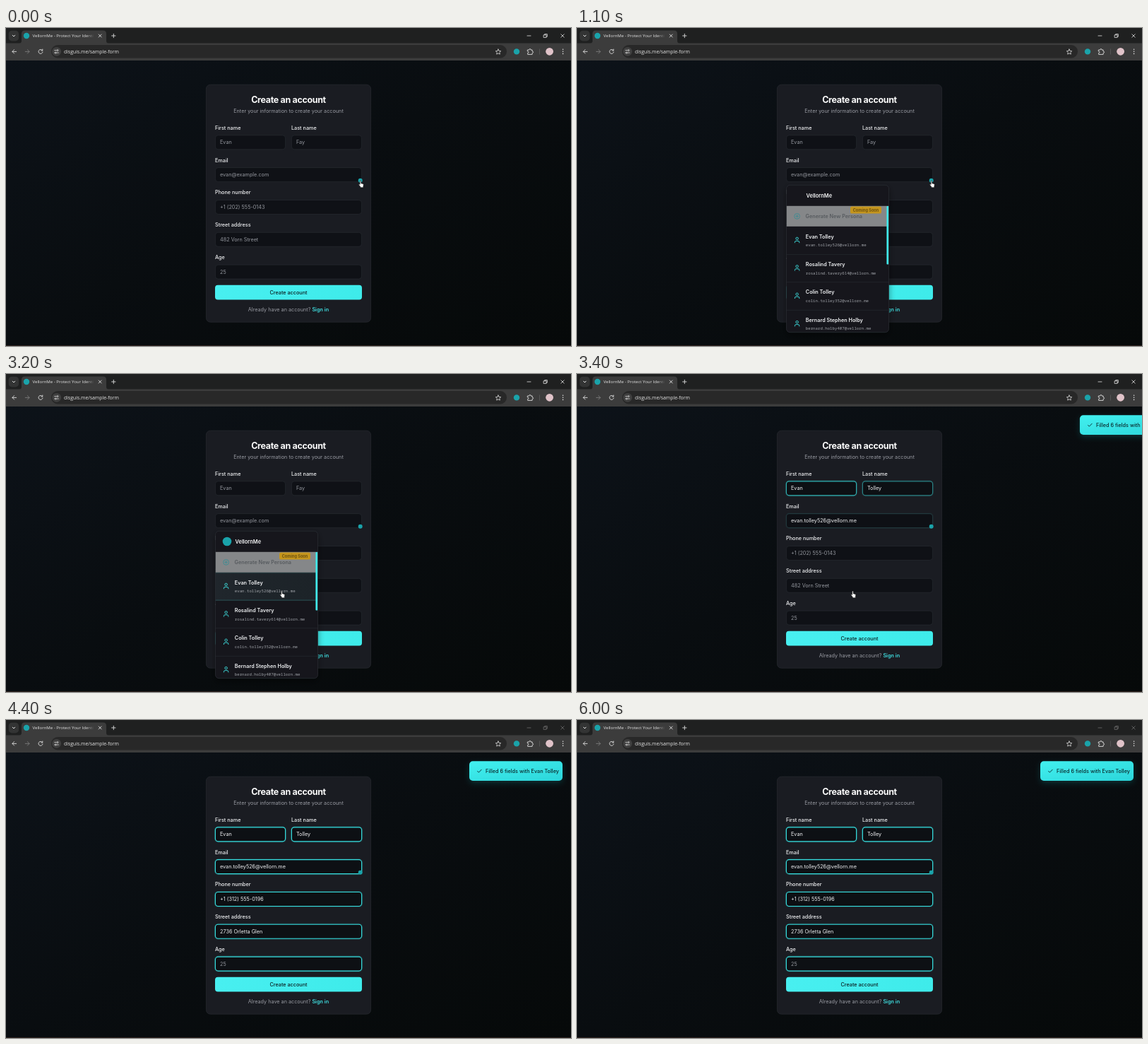
These frames come from a looping animation (800 px wide and 450 px high, 6100 ms). An HTML page:

```html
<!DOCTYPE html>
<html lang="en">
<head>
<meta charset="utf-8">
<title>Sample form</title>
<style>
html, body { margin: 0; width: 100%; height: 100%; overflow: hidden; background: #0a0d10; }
svg { display: block; width: 800px; height: 450px; }
text { font-family: Inter, sans-serif; font-size: 7.25px; white-space: pre; }
.ui { font-family: "Open Sans", "Noto Sans", sans-serif; }
.mono { font-family: "Noto Sans Mono", monospace; font-size: 5.72px; }
.line { fill: none; stroke-linecap: round; stroke-linejoin: round; }
</style>
</head>
<body>
<svg id="stage" viewBox="0 0 800 450" xmlns="http://www.w3.org/2000/svg"></svg>
<script>
const LOOP = 6100, STEP = 100;
const OPEN = 1100, LOGO = 1200, FILL = 3300, BLUR = 4400;
const BRAND = "VellornMe", DOMAIN = "@vellorn.me", TEAL = "#1aa3aa", CYAN = "#40e8e8";

const rect = (x, y, w, h, rx, fill, more = "") =>
  `<rect x="${x}" y="${y}" width="${w}" height="${h}" rx="${rx}" fill="${fill}" ${more}/>`;
const dot = (x, y, r, fill, more = "") => `<circle cx="${x}" cy="${y}" r="${r}" fill="${fill}" ${more}/>`;
const line = (d, color, w = 0.9, more = "") =>
  `<path class="line" d="${d}" stroke="${color}" stroke-width="${w}" ${more}/>`;
const text = (x, y, s, fill, more = "") => `<text x="${x}" y="${y}" fill="${fill}" ${more}>${s}</text>`;
const grad = (id, coords, ...stops) => `<linearGradient id="${id}" ${coords}>` + stops.map(([o, c, a = 1]) =>
  `<stop offset="${o}" stop-color="${c}" stop-opacity="${a}"/>`).join("") + `</linearGradient>`;

const fields = [
  { label: "First name", hint: "Evan", value: "Evan", x: 296, row: 0, w: 100 },
  { label: "Last name", hint: "Fay", value: "Tolley", x: 404, row: 0, w: 100 },
  { label: "Email", hint: "evan@example.com", value: "evan.tolley526" + DOMAIN, row: 1 },
  { label: "Phone number", hint: "+1 (202) 555-0143", value: "+1 (312) 555-0196", row: 2 },
  { label: "Street address", hint: "482 Vorn Street", value: "2736 Orletta Glen", row: 3 },
  { label: "Age", hint: "25", value: "", row: 4 }
].map(f => ({ x: 296, w: 208, ...f, y: 151.4 + f.row * 45.83 }));

const people = [
  ["Evan Tolley", "evan.tolley526"],
  ["Rosalind Tavery", "rosalind.tavery614"],
  ["Colin Tolley", "colin.tolley352"],
  ["Bernard Stephen Holby", "bernard.holby407"]
];

const defs = () => `<defs>
  ${grad("page", 'x1="0" y1="0" x2="1" y2="1"', [0, "#0d131a"], [0.5, "#090d10"], [1, "#060909"])}
  ${grad("fade", "", [0, "#3c3c3c", 0], [1, "#3c3c3c"])}
  ${grad("button", "", [0, "#48eff0"], [1, "#3eebea"])}
  ${grad("toastFill", 'x1="0" y1="0" x2="1" y2="1"', [0, "#42f0ef"], [1, "#2bd5da"])}
  ${grad("hoverFill", "", [0, "#20262c"], [1, "#1c2328"])}
  <clipPath id="menuClip">${rect(296.5, 222.3, 145, 208.4, 5, "#fff")}</clipPath>
  <filter id="shadow" x="-30%" y="-30%" width="160%" height="160%">
    <feDropShadow dx="0" dy="4" stdDeviation="5" flood-color="#000" flood-opacity=".45"/></filter>
  <filter id="soft" x="-30%" y="-60%" width="160%" height="220%">
    <feDropShadow dx="0" dy="3" stdDeviation="4" flood-color="#22c5c8" flood-opacity=".2"/></filter>
</defs>`;

function browser() {
  const ink = "#dedede";
  return rect(0, 0, 800, 22, 0, "#1f2020") + rect(0, 21.5, 800, 24.5, 0, "#3c3c3c") +
    rect(3.7, 3.8, 14.4, 14.6, 4.5, "#333434") +
    line("M9.2 10.2l1.8 1.8l1.8-1.8", ink, 1) +
    `<path d="M18 22q4 0 4-4V8q0-4.5 4.5-4.5H137.5q4.5 0 4.5 4.5V18q0 4 4 4z" fill="#3c3c3c"/>` +
    dot(29, 11, 4.2, TEAL) +
    text(37.6, 13.3, BRAND + " - Protect Your Identi", "#e3e3e3", 'class="ui" style="font-size:6.05px"') +
    rect(113, 5, 13, 12, 0, "url(#fade)") +
    line("M131.2 9l4 4m0-4l-4 4", ink) +
    line("M149.6 11h5.4m-2.7-2.7v5.4", ink) +
    `<g id="controls" class="line" stroke-width=".8">
      <path d="M738 11h5"/><path d="M761.5 9.8h3.6v3.6h-3.6zM762.7 9.7v-1.1h3.6v3.6h-1.1"/>
      <path d="M785.8 8.8l4.4 4.4m0-4.4l-4.4 4.4"/></g>` +
    line("M14.6 33.4H9m2.6-2.7L8.9 33.4l2.7 2.7", ink) +
    line("M27.3 33.4H33m-2.6-2.7l2.7 2.7l-2.7 2.7", "#7b7b7b") +
    line("M51.5 31.6A3 3 0 1 0 52 34M51.8 30v2h-2", ink) +
    rect(64, 24, 645, 18.4, 9.2, "#282828") + dot(71.6, 33.3, 6.4, "#404040") +
    line("M68.8 31.6h2.4M68.8 35h.6M72 35h2.4", ink, 0.8) +
    dot(73, 31.6, 1, "none", `stroke="${ink}" stroke-width=".8"`) +
    dot(70.4, 35, 1, "none", `stroke="${ink}" stroke-width=".8"`) +
    text(82, 36, "disguis.me/sample-form", "#e3e3e3", 'class="ui" style="font-size:6.87px"') +
    line("M697 30l1.1 2.4l2.6.3l-1.9 1.8l.5 2.6l-2.3-1.3l-2.3 1.3l.5-2.6l-1.9-1.8l2.6-.3z", ink, 0.8) +
    dot(723, 33.4, 4.2, TEAL) +
    line("M738.7 31h2q0-1.5 1.2-1.5t1.2 1.5h2v2q1.4 0 1.4 1.2t-1.4 1.2v2h-6.4v-2q1.3-.1 1.3-1.2t-1.3-1.2z", ink, 0.9) +
    rect(755.2, 29.5, 0.7, 8, 0, "#626262") +
    dot(769.6, 33.3, 5.4, "#e0c3c9") +
    [30.2, 33.3, 36.4].map(y => dot(788.6, y, 0.8, ink)).join("");
}

const fieldMarkup = (f, i) => {
  const box = `x="${f.x + 0.4}" y="${f.y + 0.4}" width="${f.w - 0.8}" height="20" rx="4"`;
  return text(f.x, f.y - 7.6, f.label, "#f1f2f4", 'font-weight="500"') +
    `<rect ${box} fill="#0f1116" stroke="#282b31" stroke-width=".7"/>
    <g id="ring${i}"><rect ${box} fill="none" stroke="${CYAN}" stroke-opacity=".16" stroke-width="3"/>
    <rect ${box} fill="#0d1014" stroke="#35dcdd" stroke-width="1.15"/></g>` +
    text(f.x + 7, f.y + 12.9, f.hint, "#94979e", `id="value${i}"`);
};

function form() {
  return rect(283.4, 80.2, 233.2, 336, 6, "#1a1c22", 'stroke="#292c32" stroke-width=".7"') +
    text(400, 105.8, "Create an account", "#fafafa",
      'text-anchor="middle" font-weight="700" style="font-size:12.5px;letter-spacing:-.34px"') +
    text(400, 119.7, "Enter your information to create your account", "#989aa2", 'text-anchor="middle"') +
    fields.map(fieldMarkup).join("") +
    dot(501.7, 215.8, 3, TEAL) +
    rect(296, 363.8, 208, 20.8, 4, "url(#button)") +
    text(400, 376.8, "Create account", "#0c2124", 'text-anchor="middle" font-weight="500"') +
    text(400, 400.8, `Already have an account? <tspan fill="#3fdfe0" font-weight="600">Sign in</tspan>`,
      "#989aa2", 'text-anchor="middle"');
}

const personRow = ([name, mail], i) => {
  const y = 281 + i * 39.4;
  return (i ? rect(296, y - 0.3, 146, 0.6, 0, "#262a30") : `<g id="hover">${rect(296, y, 146, 39.4, 0, "url(#hoverFill)")}
    ${rect(296, y, 146, 0.6, 0, "#2b4f53")}${rect(296, y + 38.8, 146, 0.8, 0, "#2b7a7c")}</g>`) +
    dot(311.6, y + 16.9, 1.7, "none", `stroke="${CYAN}" stroke-width=".9"`) +
    line(`M308.4 ${y + 22.8}v-.6q0-1.8 1.8-1.8h2.8q1.8 0 1.8 1.8v.6`, CYAN) +
    text(323.8, y + 16.6, name, "#eef0f2", 'font-weight="600"') +
    text(323.8, y + 28.2, mail + DOMAIN, "#a0a3a9", 'class="mono"');
};

function menu() {
  return `<g id="menu">${rect(296.5, 222.3, 145, 208.4, 5, "#15181d", 'filter="url(#shadow)"')}
    <g clip-path="url(#menuClip)">` +
    dot(313, 237, 6.3, TEAL, 'id="logo"') +
    text(324.6, 239.7, BRAND, "#f5f6f7", 'font-weight="600" style="font-size:7.4px"') +
    people.map(personRow).join("") +
    rect(296, 251.8, 146, 29, 0, "#858789") +
    dot(311.6, 266.4, 3.9, "none", 'stroke="#3d8d93" stroke-width=".9"') +
    line("M309.8 266.4h3.6m-1.8-1.8v3.6", "#3d8d93") +
    text(323.6, 269, "Generate New Persona", "#575b5f", 'font-weight="600"') +
    rect(387, 252.6, 44, 10, 2.2, "#c4951d") +
    text(409, 259.5, "Coming Soon", "#6c5210", 'text-anchor="middle" font-weight="700" style="font-size:5.6px"') +
    rect(438.4, 252, 3.2, 82.5, 1, CYAN) + `</g>` +
    rect(296.5, 222.3, 145, 208.4, 5, "none", 'stroke="#2b2f35" stroke-width=".7"') + `</g>`;
}

const toast = () => `<g id="toast">${rect(656, 58.3, 132, 27.7, 5, "url(#toastFill)", 'filter="url(#soft)"')}
  ${line("M667.6 72.4l1.8 1.8l3.8-4", "#0b2a2d", 0.9)}
  ${text(679, 74.9, "Filled 6 fields with Evan Tolley", "#0b2a2d", 'font-weight="500"')}</g>`;

const hand = () => `<path id="hand" fill="#fff" stroke="#111" stroke-width=".6" stroke-linejoin="round"
  d="M-1.9-4q0-.9.8-.9t.8.9V-1.2l2.6.6q1 .3 1 1.3L2.9 3.2V4.8H-1.2V3.8L-3.4.9q-.3-.9.5-1.1q.6 0 1 .7z"/>`;

const $ = id => document.getElementById(id);
$("stage").innerHTML = defs() + rect(0, 0, 800, 450, 0, "url(#page)") + rect(0, 449.2, 800, 0.8, 0, "#3a2a24") +
  browser() + form() + menu() + toast() + hand();

const clamp = p => Math.max(0, Math.min(1, p));
const span = (t, start, length) => clamp((t - start) / length);
const smooth = p => p * p * (3 - 2 * p);
const easeOut = p => 1 - (1 - p) ** 3;
const show = (id, on) => { $(id).style.display = on ? "" : "none"; };

function draw(t) {
  // the pointer glides to the first person, then settles
  const a = smooth(span(t, 1300, 900)), b = smooth(span(t, 2300, 600));
  const x = 503 - 104.5 * a - 7 * b, y = 221 + 85.5 * a + 5.5 * b;
  $("hand").setAttribute("transform", `translate(${x} ${y})`);
  show("hand", t < BLUR);
  show("menu", t >= OPEN && t < FILL);
  show("logo", t >= LOGO);
  show("hover", x < 441 && y > 284);

  fields.forEach((f, i) => {
    const start = FILL + i * 45, filled = t >= start && f.value;
    $("ring" + i).setAttribute("opacity", easeOut(span(t, start, 260)));
    const value = $("value" + i);
    value.textContent = filled ? f.value : f.hint;
    value.setAttribute("fill", filled ? "#f0f1f3" : "#94979e");
  });

  show("toast", t >= FILL);
  $("toast").setAttribute("transform", `translate(${144 * (1 - easeOut(span(t, FILL, 370)))} 0)`);
  $("controls").setAttribute("stroke", t < BLUR ? "#e2e2e2" : "#6c6c6c");
}

const begin = performance.now();
function tick() {
  const t = (performance.now() - begin) % LOOP;
  draw(Math.floor(t / STEP) * STEP);
  requestAnimationFrame(tick);
}
tick();
</script>
</body>
</html>
```
